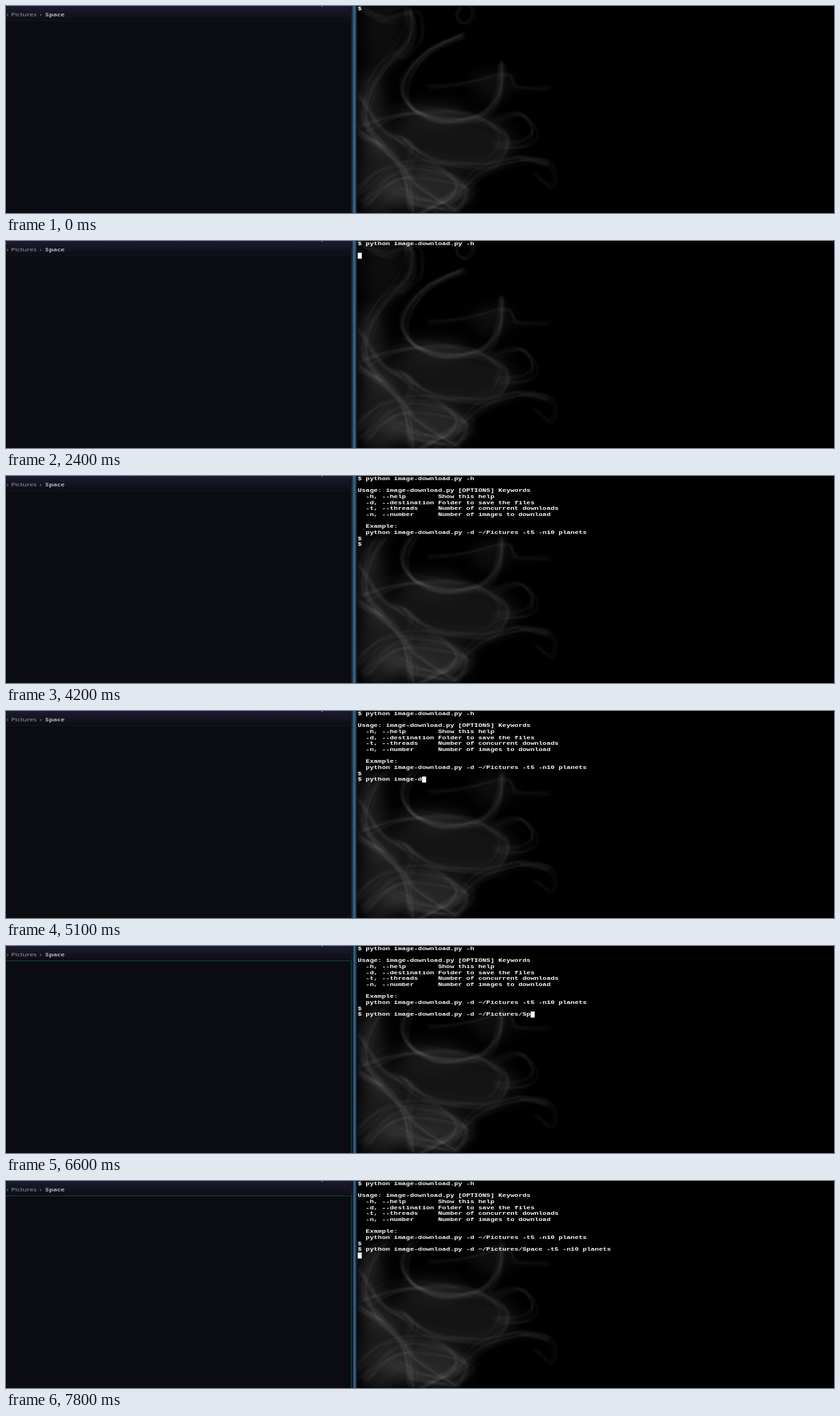
Recreate the animation shown at these times as an HTML page. Size 1200 by 300 pixels, loop 8000 ms.

```html
<!DOCTYPE html>
<html lang="en">
<head>
<meta charset="utf-8">
<title>Image download</title>
<style>
  html, body { margin: 0; width: 100%; height: 100%; overflow: hidden; background: #000; }
  svg { display: block; width: 1200px; height: 300px; }
  text { white-space: pre; }
  .term { font: bold 7.65px "Liberation Mono", monospace; fill: #fff; }
  .crumb { font: 7.7px "Noto Sans", "Open Sans", sans-serif; fill: #9b9ca2; }
  .crumb .here { font-weight: bold; fill: #b4b5ba; }
</style>
</head>
<body>
<svg viewBox="0 0 1200 300">
  <defs>
    <linearGradient id="bar" x2="0" y2="1">
      <stop offset="0" stop-color="#1b1b32"/>
      <stop offset=".5" stop-color="#141422"/>
      <stop offset="1" stop-color="#0d0d15"/>
    </linearGradient>
    <linearGradient id="edge">
      <stop offset="0" stop-color="#0b0c11"/>
      <stop offset=".3" stop-color="#1c3244"/>
      <stop offset=".55" stop-color="#3b6c92"/>
      <stop offset=".72" stop-color="#2d516e"/>
      <stop offset="1" stop-color="#05070a"/>
    </linearGradient>
    <linearGradient id="shade" x2="0" y2="1">
      <stop offset=".86" stop-color="#000"/>
      <stop offset="1" stop-color="#000" stop-opacity="0"/>
    </linearGradient>
    <filter id="soft" x="-50%" y="-50%" width="200%" height="200%"><feGaussianBlur stdDeviation="11"/></filter>
    <filter id="fine" filterUnits="userSpaceOnUse" x="500" y="-20" width="330" height="340"><feGaussianBlur stdDeviation=".9"/></filter>
    <clipPath id="right"><rect x="509" width="691" height="300"/></clipPath>
  </defs>

  <rect width="1200" height="300" fill="#000"/>
  <g clip-path="url(#right)">
    <g id="haze" fill="#fff" filter="url(#soft)"></g>
    <g id="smoke" fill="none" stroke="#fff" filter="url(#fine)"></g>
    <rect id="cover" x="509" width="691" height="95" fill="url(#shade)"/>
  </g>

  <rect width="502" height="300" fill="#0b0c11"/>
  <rect width="502" height="21" fill="url(#bar)"/>
  <rect y="21" width="502" height="1" fill="#14161e"/>
  <rect x="457" width="2" height="1" fill="#85868e"/>
  <g class="crumb" transform="scale(1.27 1)">
    <text x=".6" y="15">›</text>
    <text x="6" y="15.3">Pictures</text>
    <text x="38.4" y="15">›</text>
    <text class="here" x="44.7" y="15.3">Space</text>
  </g>
  <rect x="499" width="10" height="300" fill="url(#edge)"/>
  <g id="focus">
    <path d="M0 21.5H500.5V300" fill="none" stroke="#15414a"/>
    <rect x="501" width="2.5" height="300" fill="#0e1a24"/>
  </g>

  <g id="lines" class="term" transform="translate(509.7 0) scale(1.27 1)"></g>
  <rect id="cursor" width="5.9" height="8.7" fill="#fff"/>
</svg>
<script>
const LOOP = 8000, COL = 5.829, ROW = 8.67, LEFT = 509.7, TOP = -0.4, RATE = 1.8;
const NS = "http://www.w3.org/2000/svg";
const $ = id => document.getElementById(id);

function add(parent, tag, attrs) {
  const el = document.createElementNS(NS, tag);
  for (const k in attrs) el.setAttribute(k, attrs[k]);
  return parent.appendChild(el);
}

let seed = 11;
function rand() {
  seed = (seed * 16807) % 2147483647;
  return seed / 2147483647;
}
const jitter = s => (rand() + rand() - 1) * s;

// Smooth curve through the points
function curve(p) {
  let d = `M${p[0]}`;
  for (let i = 0; i < p.length - 1; i++) {
    const a = p[i - 1] || p[i], b = p[i], c = p[i + 1], e = p[i + 2] || c;
    const h = k => `${b[k] + (c[k] - a[k]) / 6}`, g = k => `${c[k] - (e[k] - b[k]) / 6}`;
    d += `C${h(0)},${h(1)} ${g(0)},${g(1)} ${c}`;
  }
  return d;
}

function wisp(count, spread, alpha, ...flat) {
  for (let n = 0; n < count; n++) {
    const shift = jitter(spread), p = [];
    for (let i = 0; i < flat.length; i += 2)
      p.push([flat[i] + shift + jitter(spread * 0.6), flat[i + 1] + shift * 0.6 + jitter(spread * 0.6)]);
    add($("smoke"), "path", {
      d: curve(p),
      "stroke-width": 0.7 + rand() * 3.5,
      "stroke-opacity": alpha * (0.4 + rand())
    });
  }
}

function haze(cx, cy, rx, ry, alpha) {
  add($("haze"), "ellipse", { cx, cy, rx, ry, "fill-opacity": alpha });
}

haze(545, 40, 30, 55, 0.05);
haze(528, 150, 20, 60, 0.10);
haze(615, 155, 50, 16, 0.07);
haze(640, 200, 100, 42, 0.08);
haze(540, 250, 30, 60, 0.10);
haze(610, 268, 62, 28, 0.15);
haze(705, 115, 30, 22, 0.05);

wisp(9, 12, 0.028, 515, 0, 548, 18, 588, 8, 592, 45, 570, 75);
wisp(12, 10, 0.035, 583, 0, 584, 50, 545, 92, 524, 130, 522, 165, 545, 200);
wisp(12, 7, 0.04, 662, 43, 612, 66, 578, 110, 586, 147, 632, 166, 690, 159, 714, 128, 720, 82);
wisp(8, 11, 0.022, 610, 115, 665, 112, 720, 98, 735, 120, 785, 119);
wisp(5, 4, 0.024, 660, 0, 653, 15, 665, 25, 677, 14, 674, 0);
wisp(14, 13, 0.027, 515, 175, 580, 155, 670, 160, 722, 190, 700, 225, 620, 222, 570, 190);
wisp(7, 6, 0.03, 705, 170, 745, 158, 766, 180, 752, 200, 712, 204);
wisp(14, 12, 0.032, 512, 185, 555, 212, 580, 248, 590, 300);
wisp(14, 16, 0.032, 515, 285, 560, 245, 620, 240, 665, 262, 640, 290, 580, 280);
wisp(10, 9, 0.03, 600, 300, 655, 270, 690, 241, 745, 222, 786, 228);
wisp(5, 5, 0.022, 745, 222, 785, 224, 797, 245, 790, 262, 768, 244);
wisp(8, 10, 0.026, 515, 130, 550, 185, 592, 205, 588, 250, 660, 300);

const HELP = [
  "",
  "Usage: image-download.py [OPTIONS] Keywords",
  "  -h, --help        Show this help",
  "  -d, --destination Folder to save the files",
  "  -t, --threads     Number of concurrent downloads",
  "  -n, --number      Number of images to download",
  "",
  "  Example:",
  "  python image-download.py -d ~/Pictures -t5 -n10 planets",
  "$ "
];
const FIRST = "python image-download.py -h";
const SECOND = "python image-download.py -d ~/Pictures/Space -t5 -n10 planets";

const rows = Array.from({ length: 12 }, (_, i) =>
  add($("lines"), "text", { x: 0, y: TOP + i * ROW + 6.4 }));

const typed = (text, t, start) =>
  text.slice(0, Math.max(0, Math.floor((t - start) / 100 * RATE + 1e-6)));

// Rows of text and the cursor cell [column, row], or null while it is off
function screen(t) {
  if (t < 2500) {
    const line = "$ " + typed(FIRST, t, 800);
    let cursor = [line.length, 0];
    if (t < 200 || (t >= 800 && t < 900)) cursor = null;
    if (t >= 2400) cursor = [0, 2];
    return { text: [line], cursor };
  }
  const line = "$ " + typed(SECOND, t, 4300);
  let cursor = [line.length, 11];
  if (t < 4400 && Math.floor((t - 2400) / 600) % 2) cursor = null;
  if (t >= 7800) cursor = [0, 12];
  return { text: ["$ " + FIRST, ...HELP, line], cursor };
}

const ramp = (t, a, b) => Math.min(1, Math.max(0, (t - a) / (b - a)));

function draw(now) {
  const t = Math.floor(now % LOOP / 100) * 100;
  const { text, cursor } = screen(t);
  rows.forEach((el, i) => {
    const s = text[i] || "";
    if (el.textContent !== s) el.textContent = s;
  });
  $("cursor").style.display = cursor ? "" : "none";
  if (cursor) {
    $("cursor").setAttribute("x", LEFT + cursor[0] * COL);
    $("cursor").setAttribute("y", TOP + cursor[1] * ROW);
  }
  $("cover").setAttribute("opacity", t < 2500 ? 0 : 0.7 + 0.3 * ramp(t, 2500, 2800));
  $("focus").setAttribute("opacity", ramp(t, 5200, 6100));
}

const begin = performance.now();
function tick() {
  draw(performance.now() - begin);
  requestAnimationFrame(tick);
}
draw(0);
requestAnimationFrame(tick);
</script>
</body>
</html>
```
